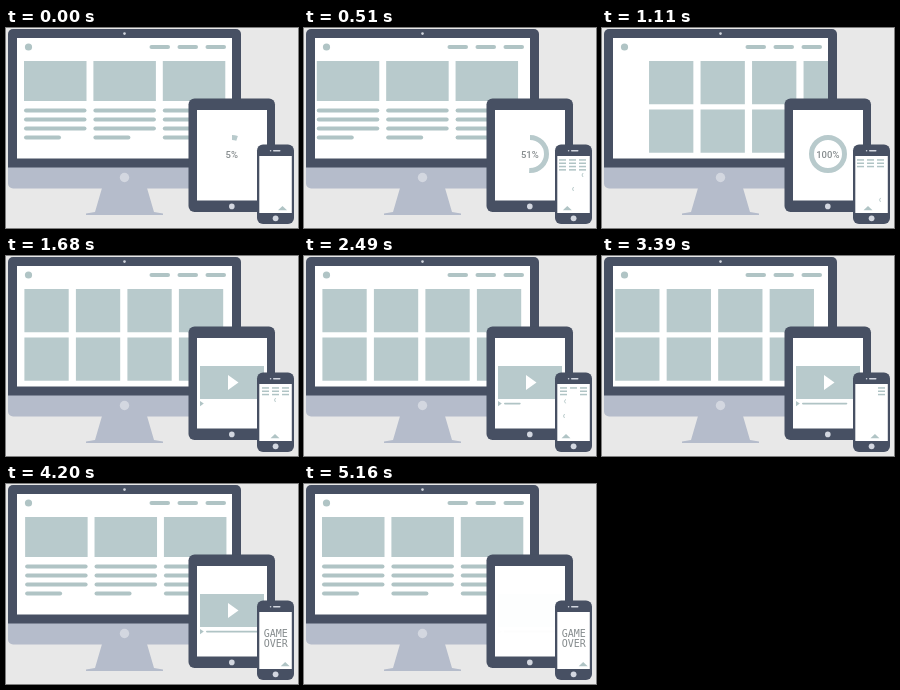
These frames come from a looping animation (292x200 px, 5.25 s). An HTML page with a canvas:

```html
<!DOCTYPE html>
<html lang="en">
<head>
<meta charset="utf-8">
<title>Responsive devices</title>
<style>
  html, body { margin: 0; width: 100%; height: 100%; overflow: hidden; background: #e8e8e8; }
  canvas { display: block; width: 292px; height: 200px; }
</style>
</head>
<body>
<canvas id="stage"></canvas>
<script>
const W = 292, H = 200, LOOP = 5250, STEP = 30;
const BG = '#e8e8e8', DARK = '#475063', METAL = '#b5bccb', KNOB = '#d3d7e0';
const CARD = '#b8cacc', LINE = '#b0c4c5', INK = '#858b8d';

const canvas = document.getElementById('stage');
const ctx = canvas.getContext('2d');
const dpr = window.devicePixelRatio || 1;
canvas.width = W * dpr;
canvas.height = H * dpr;

const clamp = v => Math.max(0, Math.min(1, v));
const ramp = (t, a, b) => clamp((t - a) / (b - a));

function box(x, y, w, h, color, r = 0) {
  ctx.fillStyle = color;
  ctx.beginPath();
  ctx.roundRect(x, y, w, h, r);
  ctx.fill();
}

function disc(x, y, r, color) {
  ctx.fillStyle = color;
  ctx.beginPath();
  ctx.arc(x, y, r, 0, Math.PI * 2);
  ctx.fill();
}

function poly(points, color) {
  ctx.fillStyle = color;
  ctx.beginPath();
  points.forEach(([x, y]) => ctx.lineTo(x, y));
  ctx.fill();
}

function label(text, x, y, font) {
  ctx.font = font;
  ctx.fillStyle = INK;
  ctx.textAlign = 'center';
  ctx.fillText(text, x, y);
}

function clipped(x, y, w, h, draw) {
  ctx.save();
  ctx.beginPath();
  ctx.rect(x, y, w, h);
  ctx.clip();
  draw();
  ctx.restore();
}

// Cubic bezier easing (.5, 0, .35, 1), solved by bisection
function ease(u) {
  if (u <= 0 || u >= 1) return clamp(u);
  let lo = 0, hi = 1, s = 0.5;
  for (let i = 0; i < 24; i++) {
    s = (lo + hi) / 2;
    const x = 1.5 * (1 - s) ** 2 * s + 1.05 * (1 - s) * s * s + s ** 3;
    if (x < u) lo = s; else hi = s;
  }
  return s * s * (3 - 2 * s);
}

// ---- Desktop ----
const PAGE = 340, SLIDE = 968;

function articles(dx) {
  for (let c = 0; c < 3; c++) {
    const x = 18 + c * 69.4 + dx;
    box(x, 33, 62.5, 40, CARD);
    for (let r = 0; r < 4; r++) box(x, 80.5 + r * 9, r < 3 ? 62.5 : 37, 4, LINE, 2);
  }
}

function gallery(dx) {
  for (let c = 0; c < 4; c++)
    for (let r = 0; r < 2; r++) box(18.4 + c * 51.5 + dx, 33 + r * 48.5, 44.3, 43.3, CARD);
}

function desktop(t) {
  box(2, 130, 233, 30.5, METAL, [0, 0, 5, 5]);
  box(2, 1, 233, 138.5, DARK, [5, 5, 0, 0]);
  poly([[96, 160], [141, 160], [148, 184], [157, 185.5], [157, 187], [80, 187], [80, 185.5], [89, 184]], METAL);
  disc(118.5, 149.5, 4.7, KNOB);
  disc(118.5, 5.6, 1.3, KNOB);
  box(11, 10, 215, 120.5, '#fff');
  disc(22.5, 19, 3.6, LINE);
  for (let i = 0; i < 3; i++) box(143.5 + i * 28, 17, 20.5, 4, LINE, 2);
  clipped(11, 10, 215, 120.5, () => {
    const first = ease((t - 413) / SLIDE), second = ease((t - 3293) / SLIDE);
    if (second > 0) {
      gallery(-PAGE * second);
      articles(PAGE * (1 - second));
    } else {
      articles(-PAGE * first);
      gallery(PAGE * (1 - first));
    }
  });
}

// ---- Tablet ----
function ring(t) {
  const pct = Math.min(100, 5 + t * 70 / 780);
  const start = -Math.PI / 2;
  ctx.strokeStyle = CARD;
  ctx.lineWidth = 5;
  ctx.beginPath();
  ctx.arc(226, 126, 16.5, start, start + Math.PI * 2 * pct / 100);
  ctx.stroke();
  label(Math.round(pct) + '%', 225.8, 129.6, '500 9.5px Roboto, sans-serif');
}

function player(t) {
  box(194, 110, 64, 33, CARD);
  poly([[222, 119], [232.5, 126.5], [222, 134]], '#fff');
  poly([[194, 145], [197.8, 147.6], [194, 150.2]], LINE);
  const len = Math.min(58, (t - 1965) * 0.0318);
  if (len > 0) box(200, 146.7, len, 1.7, LINE, 0.8);
}

function playerAlpha(t) {
  if (t < 4800) return ramp(t, 1400, 1600);
  return [0.75, 0.5, 0.25, 0.03][Math.min(3, Math.floor((t - 4800) / 120))];
}

function tablet(t) {
  box(182.5, 70.5, 86.5, 113.5, DARK, 6);
  box(191, 82, 70, 90.5, '#fff');
  disc(225.8, 178.4, 2.8, KNOB);
  ctx.globalAlpha = 1 - ramp(t, 1290, 1440);
  if (ctx.globalAlpha > 0) ring(t);
  ctx.globalAlpha = playerAlpha(t);
  if (ctx.globalAlpha > 0) player(t);
  ctx.globalAlpha = 1;
}

// ---- Phone game ----
const END = 3870, SHOT_SPEED = 0.1, BOMB_SPEED = 0.07;
const rowY = r => 131.2 + r * 3.3;

// [time, x]
const shipPath = [[0, 276.5], [200, 278.5], [340, 269], [670, 258], [780, 258], [1110, 266],
  [1340, 269], [1700, 269], [2310, 260], [2490, 262], [2660, 261], [2850, 269], [3200, 269],
  [3660, 278.5], [3750, 279.2]];
// [launch time, column, row]
const shots = [[200, 2, 3], [340, 1, 3], [670, 0, 3], [1340, 1, 2], [1700, 1, 1],
  [2310, 0, 2], [2490, 0, 1], [2660, 0, 0], [2850, 1, 0]];
// [launch time, x]
const bombs = [[640, 278], [2400, 261]];

function shipX(t) {
  for (let i = 1; i < shipPath.length; i++) {
    const [a, x] = shipPath[i - 1], [b, x2] = shipPath[i];
    if (t < b) return x + (x2 - x) * ramp(t, a, b);
  }
  return shipPath[shipPath.length - 1][1];
}

const hitTime = ([at, , row]) => at + (178 - rowY(row)) / SHOT_SPEED;

function invaders(t) {
  const shift = t < 1300 ? 0 : 1;
  for (let r = 0; r < 4; r++) {
    if (t < 90 + r * 120) continue;
    for (let c = 0; c < 3; c++) {
      if (shots.some(s => s[1] === c && s[2] === r && t >= hitTime(s))) continue;
      box(255 + c * 10 + shift, rowY(r), 7, 1.5, LINE);
    }
  }
}

function spark(x, y) {
  ctx.strokeStyle = LINE;
  ctx.lineWidth = 0.9;
  ctx.beginPath();
  ctx.moveTo(x + 0.6, y - 2);
  ctx.lineTo(x - 0.5, y);
  ctx.lineTo(x + 0.5, y + 2);
  ctx.stroke();
}

function gameOver(t) {
  const on = t < 3990 || (t >= 4140 && t < 4260) || (t >= 4410 && t < 4530) || t >= 4650;
  if (!on) return;
  const font = '10px "DejaVu Sans Mono", monospace';
  label('GAME', 269.8, 152.8, font);
  label('OVER', 269.8, 162.8, font);
}

function phone(t) {
  box(251, 116.5, 37, 79.5, DARK, 6);
  box(253.3, 128, 32.5, 57, '#fff');
  disc(269.6, 190.3, 2.9, KNOB);
  box(267, 122, 7.5, 1.5, KNOB, 0.7);
  disc(264.6, 122.7, 0.8, KNOB);

  const x = shipX(t);
  poly([[x - 4.5, 182.3], [x, 178], [x + 4.5, 182.3]], LINE);
  if (t >= END) return gameOver(t);
  invaders(t);
  for (const s of shots)
    if (t > s[0] && t < hitTime(s)) spark(shipX(s[0]), 178 - (t - s[0]) * SHOT_SPEED);
  for (const [at, bx] of bombs) {
    const y = 139 + (t - at) * BOMB_SPEED;
    if (t > at && y < 181) spark(bx, y);
  }
}

function draw(now) {
  const t = Math.min(5160, Math.floor((now % LOOP) / STEP) * STEP);
  ctx.setTransform(dpr, 0, 0, dpr, 0, 0);
  box(0, 0, W, H, BG);
  desktop(t);
  tablet(t);
  phone(t);
}

const begin = performance.now();
function tick() {
  draw(performance.now() - begin);
  requestAnimationFrame(tick);
}
tick();
</script>
</body>
</html>
```
